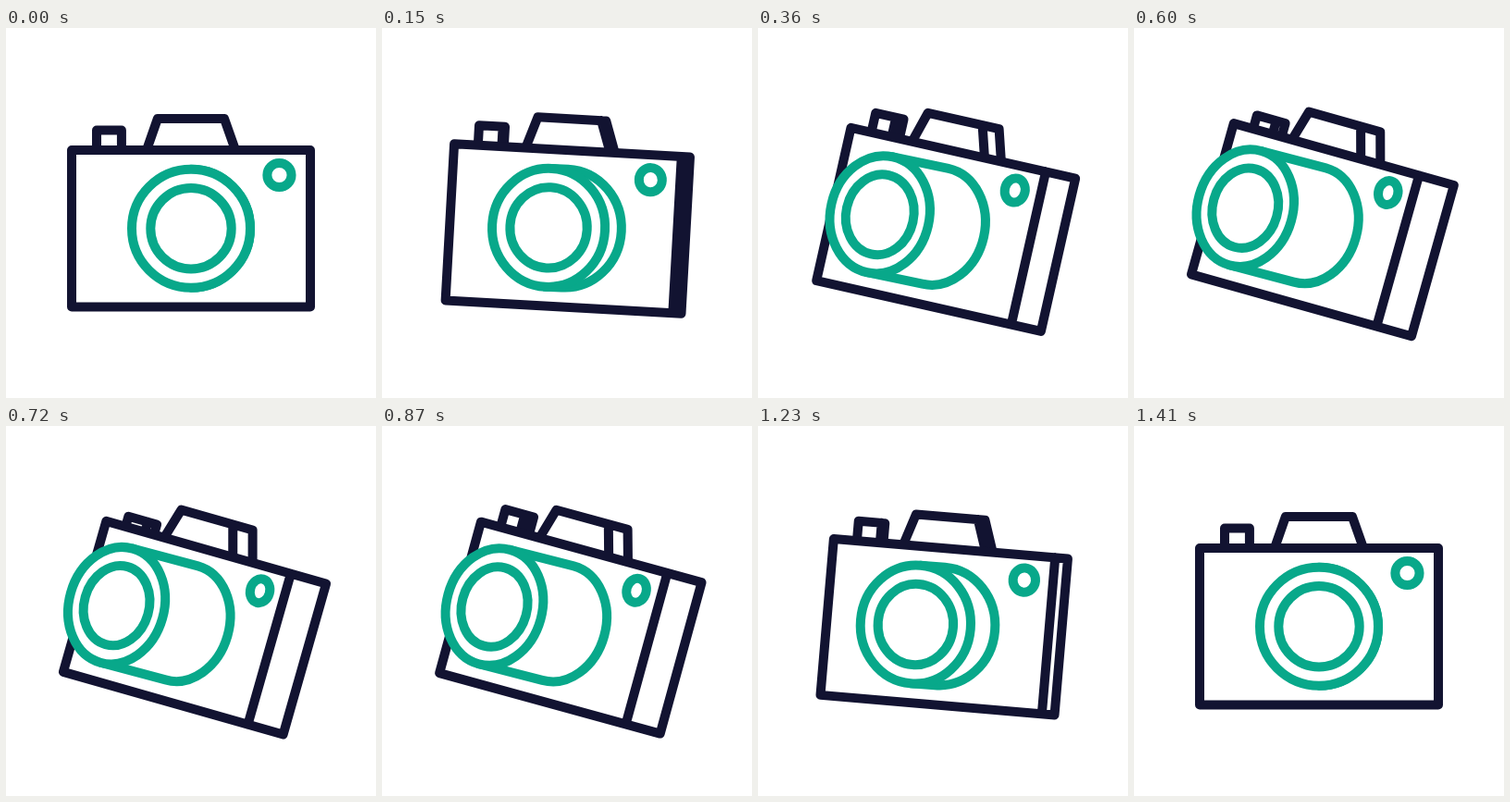
An HTML page for the animation above (3.47 s loop, 400x400 px).

```html
<!DOCTYPE html>
<html lang="en">
<head>
<meta charset="utf-8">
<title>Camera</title>
<style>
  html, body { margin: 0; width: 100%; height: 100%; overflow: hidden; background: #fff; }
  svg { display: block; width: 100%; height: 100%; }
  path, ellipse { fill: #fff; stroke-width: 10; stroke-linecap: round; stroke-linejoin: round; }
  .dark { stroke: #121331; }
  .green { stroke: #08a88a; }
</style>
</head>
<body>
<svg viewBox="0 0 400 400">
  <g id="camera">
    <path id="button" class="dark"/>
    <path id="finder" class="dark"/>
    <path id="body" class="dark"/>
    <ellipse id="lamp" class="green" cy="-57.75" ry="13.1"/>
    <path id="tube" class="green"/>
    <ellipse id="rim" class="green" ry="64"/>
    <ellipse id="glass" class="green" ry="43.7"/>
  </g>
</svg>
<script>
  const LOOP = 3470, STEP = 30, MOVE = 1410, HALF = MOVE / 2;
  const TILT = 15.9, WIDTH = 258, H = 84.75;
  const el = id => document.getElementById(id);
  const parts = {};
  for (const id of ['camera', 'button', 'finder', 'body', 'lamp', 'tube', 'rim', 'glass']) parts[id] = el(id);

  const smooth = x => {
    x = Math.min(1, Math.max(0, x));
    return x * x * (3 - 2 * x);
  };

  // cubic-bezier(.35, 0, .2, 1)
  function ease(x) {
    let lo = 0, hi = 1;
    for (let i = 0; i < 24; i++) {
      const s = (lo + hi) / 2, r = 1 - s;
      if (3 * r * r * s * 0.35 + 3 * r * s * s * 0.2 + s * s * s < x) lo = s; else hi = s;
    }
    return smooth((lo + hi) / 2);
  }

  const line = pts => 'M' + pts.map(p => p[0].toFixed(2) + ' ' + p[1].toFixed(2)).join('L');

  function set(node, attrs) {
    for (const key in attrs) node.setAttribute(key, attrs[key]);
  }

  function draw(t) {
    // out and back are mirror images of each other
    const m = t >= MOVE ? 0 : HALF - Math.abs(t - HALF);
    const a = TILT * ease(m / HALF);
    const press = 10 * smooth((m - 500) / 170);

    const total = WIDTH - 0.89 * a + 0.013 * a * a;
    const front = WIDTH - 3.86 * a + 0.043 * a * a;
    const side = total - front;
    const squash = front / WIDTH;
    const left = -total / 2, right = total / 2;
    const at = f => left + f * front;

    set(parts.camera, {
      transform: `translate(${200 + 0.25 * a} ${216.75 + 0.09 * a}) rotate(${a})`
    });

    set(parts.body, {
      d: line([[left, -H], [right, -H], [right, H], [left, H]]) + 'Z' +
         line([[at(1), -H], [at(1), H]])
    });

    const hump = 0.56 * side, top = -118.75;
    set(parts.finder, {
      d: line([[at(0.314), -H], [at(0.36), top], [at(0.6395) + hump, top], [at(0.686) + hump, -H]]) +
         line([[at(0.6395), top], [at(0.686), -H]])
    });

    const cap = 0.26 * side, capTop = -106.25 + press;
    set(parts.button, {
      d: line([[at(0.1047), -H], [at(0.1047), capTop], [at(0.209) + cap, capTop], [at(0.209) + cap, -H]]) +
         line([[at(0.209), capTop], [at(0.209), -H]])
    });

    set(parts.lamp, { cx: at(0.87), rx: 13.1 * squash });

    const rim = -6.73 * a + 0.076 * a * a;
    const base = -0.94 * a, drop = -0.08 * a, rx = 64 * squash;
    set(parts.tube, {
      d: `M${rim} -64L${base} ${drop - 64}A${rx} 64 0 0 1 ${base} ${drop + 64}L${rim} 64`
    });
    set(parts.rim, { cx: rim, rx });
    set(parts.glass, { cx: rim, rx: 43.7 * squash });
  }

  const start = performance.now();
  function tick() {
    const t = (performance.now() - start) % LOOP;
    draw(Math.floor(t / STEP) * STEP);
    requestAnimationFrame(tick);
  }
  tick();
</script>
</body>
</html>
```
